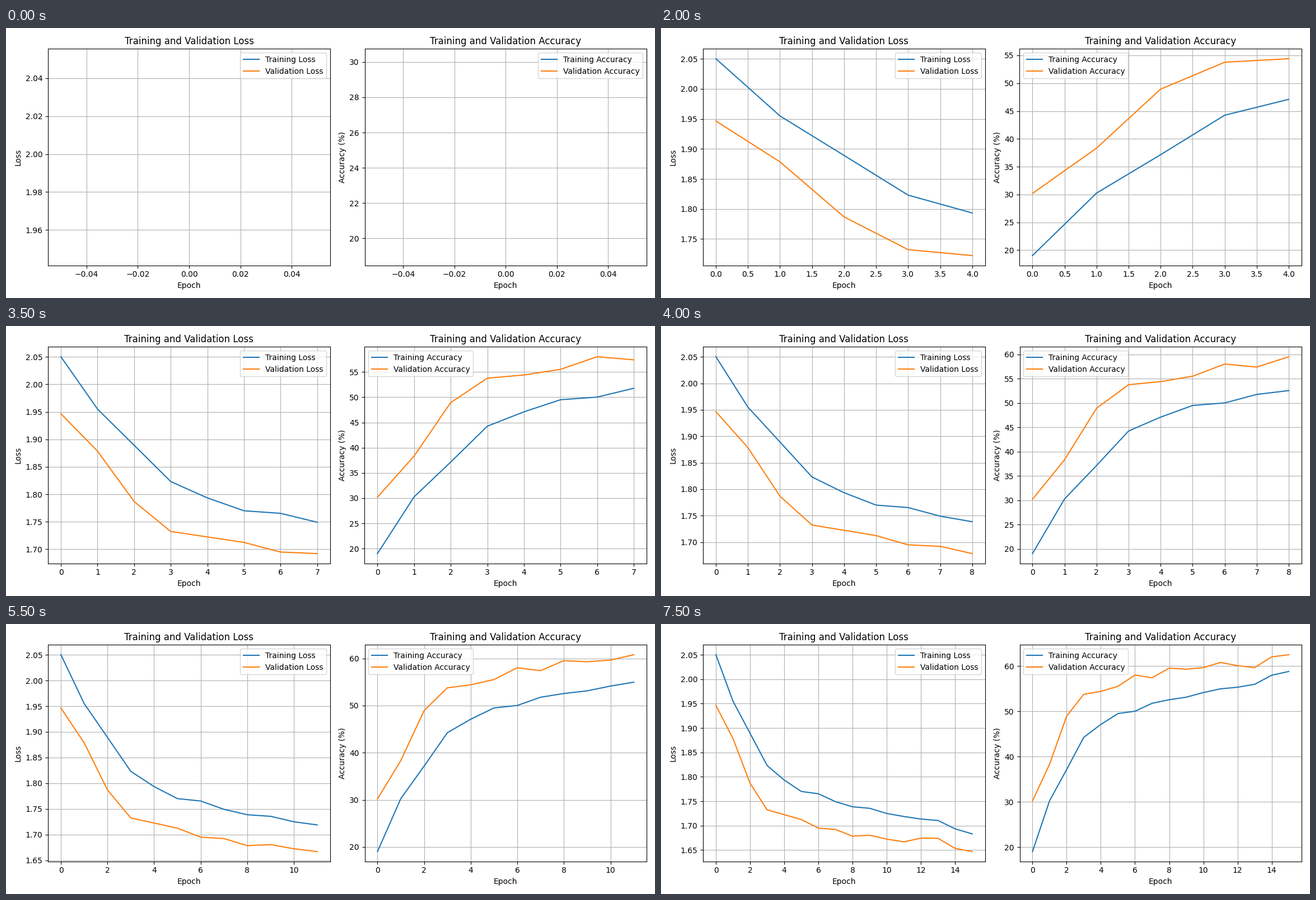
Recreate the animation shown at these times as a matplotlib script. Size 1159 by 483 pixels, loop 8000 ms.

```python
import matplotlib.pyplot as plt
from matplotlib.animation import FuncAnimation

WIDTH, HEIGHT, DPI = 1159, 483, 100

train_loss = [2.0503, 1.9550, 1.8892, 1.8231, 1.7934, 1.7700, 1.7653, 1.7491,
              1.7386, 1.7355, 1.7249, 1.7187, 1.7135, 1.7105, 1.6934, 1.6831]
val_loss = [1.9465, 1.8785, 1.7868, 1.7323, 1.7224, 1.7124, 1.6949, 1.6921,
            1.6784, 1.6804, 1.6723, 1.6668, 1.6743, 1.6740, 1.6534, 1.6468]
train_acc = [19.02, 30.25, 37.15, 44.25, 47.10, 49.50, 50.02, 51.77,
             52.56, 53.12, 54.14, 54.96, 55.32, 55.96, 57.97, 58.80]
val_acc = [30.19, 38.33, 48.93, 53.77, 54.40, 55.52, 58.02, 57.40,
           59.53, 59.30, 59.65, 60.79, 60.08, 59.66, 62.02, 62.50]

fig, (ax_loss, ax_acc) = plt.subplots(
    1, 2, figsize=(WIDTH / DPI, HEIGHT / DPI), dpi=DPI)


def draw_panel(ax, name, ylabel, train, val, count):
    ax.clear()
    ax.plot(train[:count], label=f"Training {name}")
    ax.plot(val[:count], label=f"Validation {name}")
    ax.set_title(f"Training and Validation {name}")
    ax.set_xlabel("Epoch")
    ax.set_ylabel(ylabel)
    ax.legend()
    ax.grid(True)


def update(epoch):
    # Fixed starting margins keep the layout independent of earlier epochs
    fig.subplots_adjust(left=0.063, right=0.988, bottom=0.115, top=0.925,
                        wspace=0.12)
    draw_panel(ax_loss, "Loss", "Loss", train_loss, val_loss, epoch + 1)
    draw_panel(ax_acc, "Accuracy", "Accuracy (%)", train_acc, val_acc,
               epoch + 1)
    fig.tight_layout()


anim = FuncAnimation(fig, update, frames=len(train_loss), interval=500,
                     init_func=lambda: None, repeat=True, repeat_delay=0)

plt.show()
```
